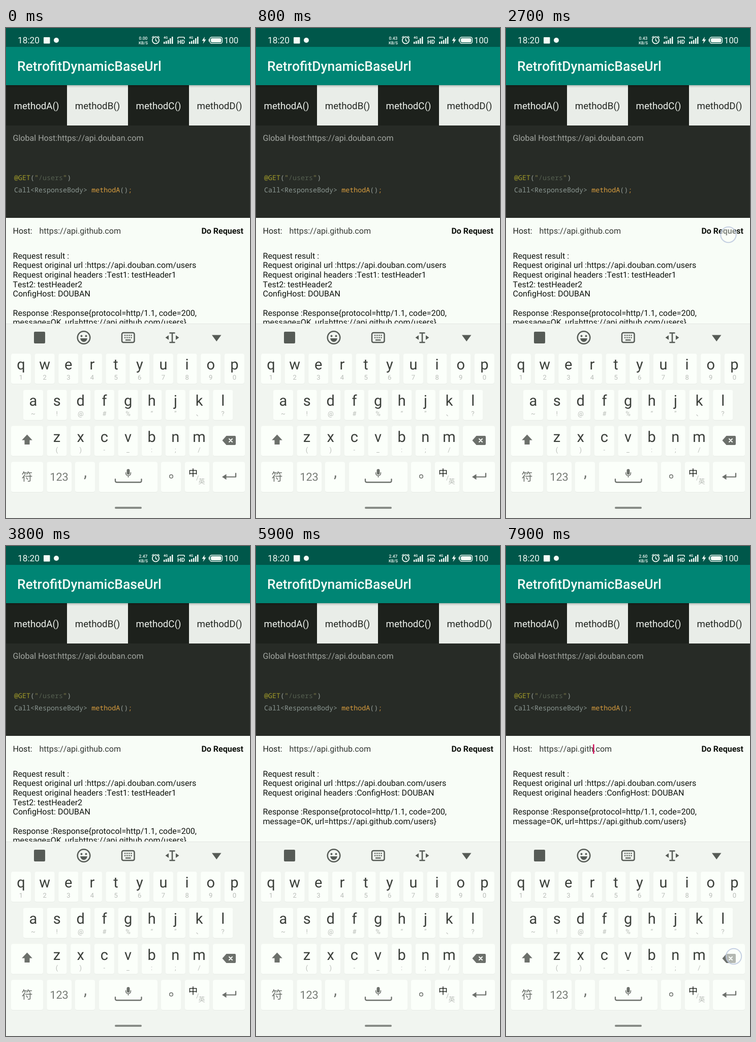
Animation, 480 px wide and 960 px high, one loop 8 s. Source, as an HTML page:

```html
<!DOCTYPE html>
<html lang="en">
<head>
<meta charset="utf-8">
<title>Base URL demo</title>
<style>
html, body { margin: 0; width: 100%; height: 100%; overflow: hidden; background: #f1f5f0; }
svg { display: block; width: 480px; height: 960px; font-family: Roboto, sans-serif; font-kerning: none; text-rendering: geometricPrecision; }
.mid { text-anchor: middle; }
.mono { font: 13.35px "Noto Sans Mono", "DejaVu Sans Mono", monospace; }
.cjk { font-family: "Noto Sans CJK SC", "Noto Sans CJK", sans-serif; text-anchor: middle; }
.line { fill: none; stroke-linecap: round; stroke-linejoin: round; }
</style>
</head>
<body>
<svg id="stage" viewBox="0 0 480 960"></svg>
<script>
const stage = document.getElementById('stage');
const BODY = 16.07;
const rect = (x, y, w, h, fill, r = 0) =>
  `<rect x="${x}" y="${y}" width="${w}" height="${h}" rx="${r}" fill="${fill}"/>`;
const text = (x, y, s, fill, size = BODY, extra = '') =>
  `<text x="${x}" y="${y}" fill="${fill}" style="font-size:${size}px" ${extra}>${s}</text>`;
const mid = (x, y, s, fill, size, extra = '') => text(x, y, s, fill, size, `class="mid" ${extra}`);
const path = (d, fill) => `<path d="${d}" fill="${fill}"/>`;
const line = (d, stroke, w) => `<path class="line" d="${d}" stroke="${stroke}" stroke-width="${w}"/>`;
const ring = (x, y, r, stroke, w) =>
  `<circle cx="${x}" cy="${y}" r="${r}" fill="none" stroke="${stroke}" stroke-width="${w}"/>`;
const dot = (x, y, r, fill) => `<circle cx="${x}" cy="${y}" r="${r}" fill="${fill}"/>`;
const W = '#f4fbf6', ICON = '#565b56', KEY = '#6c706b', PALE = '#b9bdb8';

function signal(x) {
  let s = text(x, 20.5, '4G', W, 6.5, 'font-weight="700"');
  [4, 5.5, 7.5, 11, 14].forEach((h, i) => s += rect(x + i * 4, 31 - h, 2.5, h, W));
  return s;
}

function statusBar() {
  return rect(0, 0, 480, 37, '#00574a') +
    text(23, 30, '18:20', W, 17.3) +
    rect(74, 18, 12.5, 12.5, W, 1) + dot(99, 24, 5, W) +
    mid(270, 23, '', W, 8.5, 'id="speed" font-weight="500"') +
    mid(270, 31.5, 'KB/S', W, 8, 'font-weight="500"') +
    ring(294.5, 24, 6.6, W, 1.8) + line('M294.5 20.5V24.5L297 26M287.5 18.5L290 16.3M301.5 18.5L299 16.3', W, 1.5) +
    signal(310) +
    line('M338 21V19.5Q338 18 340 18H349Q351 18 351 19.5V21', W, 1.7) +
    mid(344.5, 31, 'HD', W, 11, 'font-weight="700"') +
    signal(360) +
    path('M391 17L385.5 25H389L387.5 31L393.5 22.5H390Z', W) +
    `<rect x="401" y="18" width="24.5" height="12" rx="3.5" fill="none" stroke="${W}" stroke-width="1.4"/>` +
    rect(403, 20, 20.5, 8, W, 2) + rect(398.7, 21.5, 1.6, 5, W) +
    text(429, 30, '100', W, 16.8);
}

function app() {
  let s = rect(0, 37, 480, 75, '#008574') +
    text(22, 84.3, 'RetrofitDynamicBaseUrl', W, 26.5, 'font-weight="500"');
  [...'ABCD'].forEach((c, i) => {
    s += rect(i * 120, 112, 120, 79, i % 2 ? '#e9ede8' : '#1d211c') +
      mid(i * 120 + 60, 158.5, `method${c}()`, i % 2 ? '#20241f' : '#f0f4ef', 18.67);
  });
  s += rect(0, 112, 480, 5, 'url(#shade)') + rect(0, 191, 480, 181, '#272b26') +
    text(13.5, 221, 'Global Host:https://api.douban.com', '#a3a7a2');
  const code = (y, parts) => `<text class="mono" x="16" y="${y}">` +
    parts.map(([t, c]) => `<tspan fill="${c}">${t}</tspan>`).join('') + '</text>';
  s += code(297.5, [['@GET', '#a19b2a'], ['(', '#929b97'], ['"', '#87834f'], ['/users', '#555f50'], ['"', '#87834f'], [')', '#929b97']]) +
    code(321.5, [['Call&lt;ResponseBody&gt; ', '#8b9792'], ['methodA', '#d99d3e'], ['()', '#929b97'], [';', '#bd8536']]);
  return s + rect(0, 372, 480, 207, '#f8fdf7') +
    text(13.5, 403, 'Host:', '#1c201b') +
    text(65.5, 403, '', '#343833', BODY, 'id="host"') +
    `<rect id="caret" y="388.5" width="2.6" height="18.5" fill="#d31c62"/>` +
    text(467, 403, 'Do Request', '#0c100b', 16, 'text-anchor="end" font-weight="700"') +
    '<g id="result" clip-path="url(#pane)"></g>';
}

function toolbar() {
  let s = rect(0, 579, 480, 381, '#f1f5f0') + rect(0, 579, 480, 1, '#e3e7e2') +
    rect(55, 595, 22, 23, ICON, 2) +
    ring(153, 606.5, 12.3, ICON, 2.5) + dot(148.5, 603.5, 1.9, ICON) + dot(157.5, 603.5, 1.9, ICON) +
    path('M146 608H160Q158.5 615 153 615T146 608Z', ICON) +
    `<rect x="228" y="597" width="24.5" height="19" rx="3" fill="none" stroke="${ICON}" stroke-width="2.5"/>` +
    rect(235, 610.2, 10.5, 2.2, ICON);
  for (let i = 0; i < 8; i++) s += rect(233 + i % 4 * 4.1, 601 + (i >> 2) * 4.5, 2.3, 2.3, ICON);
  return s + line('M322.5 597.5H331.5M322.5 616H331.5M327 597.5V616', ICON, 2.5) +
    path('M320 602V611L313.5 606.5ZM334 602V611L340.5 606.5Z', ICON) +
    path('M405 601.5H423.5L414.2 614Z', ICON);
}

function keyboard() {
  const key = (x, y, w) => rect(x, y + 1, w, 59, '#e8ece7', 4) + rect(x, y, w, 59, '#fbfffa', 4);
  const rows = [
    [10, 638, 'qwertyuiop', '1234567890'],
    [34, 709, 'asdfghjkl', '~!@#%“”、?'],
    [80.5, 779.5, 'zxcvbnm', '()-_:;/']
  ];
  let s = '';
  for (const [x0, y, letters, marks] of rows)
    [...letters].forEach((c, i) => {
      const x = x0 + i * 46.65;
      s += key(x, y, 39) + mid(x + 19.5, y + 31.2, c, '#3b3f3a', 29) +
        mid(x + 19.5, y + 51, marks[i], PALE, 13);
    });
  s += key(10, 779.5, 63) + key(407, 779.5, 63);
  for (const [x, w] of [[10, 63], [80.5, 48.5], [136, 39], [183, 115], [305, 39], [352, 48], [407, 63]])
    s += key(x, 850, w);
  return s +
    path('M41.5 796.5L51.8 807.5H46.5V816H36.5V807.5H31.2Z', KEY) +
    path('M425.5 808L433.5 799H450Q452 799 452 801V815Q452 817 450 817H433.5Z', KEY) +
    line('M439 805L445 811M445 805L439 811', '#fbfffa', 2) +
    text(41.5, 886.5, '符', KEY, 22, 'class="cjk"') +
    mid(104.5, 886.5, '123', '#767a75', 21.7) +
    mid(156, 880, ',', KEY, 31) +
    rect(237.5, 864, 6, 11, KEY, 3) + line('M235.5 871Q235.5 877 240.5 877T245.5 871M240.5 877V880', KEY, 1.5) +
    line('M215 884V887Q215 890 218 890H263.5Q266.5 890 266.5 887V884', KEY, 2.3) +
    ring(325, 878.5, 3.3, KEY, 1.5) +
    text(368, 878, '中', '#171b16', 18, 'class="cjk"') +
    line('M375 886L378.5 877', PALE, 1) +
    text(385, 893, '英', PALE, 13, 'class="cjk"') +
    line('M452 872.5V879.5H430', KEY, 2.2) + path('M425 879.5L433.5 874V885Z', KEY) +
    rect(214, 938, 53, 4, '#878b86', 2);
}

stage.innerHTML = `<defs>
  <linearGradient id="shade" x2="0" y2="1"><stop stop-opacity=".2"/><stop offset="1" stop-opacity="0"/></linearGradient>
  <clipPath id="pane"><rect y="372" width="480" height="207"/></clipPath></defs>` +
  statusBar() + app() + toolbar() + keyboard() +
  '<circle id="touch" r="15.2" fill="#fbfffa" fill-opacity=".5" stroke="#bcc8de" stroke-opacity=".85" stroke-width="2"/>';

const [speed, host, caret, result, touch] =
  ['speed', 'host', 'caret', 'result', 'touch'].map(id => document.getElementById(id));
const head = ['Request result :', 'Request original url :https://api.douban.com/users'];
const tail = ['ConfigHost: DOUBAN', '', 'Response :Response{protocol=http/1.1, code=200,',
  'message=OK, url=https://api.github.com/users}'];
const label = 'Request original headers :';
const lines = list => list.map((s, i) => text(13.5, 451.8 + i * 18.66, s, '#10140f')).join('');
const before = lines([...head, label + 'Test1: testHeader1', 'Test2: testHeader2', ...tail]);
const after = lines([...head, label + tail[0], ...tail.slice(1)]);
// [start, end, x, y]
const taps = [[2600, 2750, 437.5, 405], [2750, 2900, 437.5, 407], [7400, 7600, 448, 804], [7800, 8000, 448, 804]];
let shown;

function frame(now) {
  const t = now % 8000;
  speed.textContent = t < 400 ? '0.00' : t < 3400 ? '0.43' : t < 6400 ? '2.47' : '2.60';
  const deleted = (t >= 7400) + (t >= 7800);
  host.textContent = `https://api.${'github'.slice(0, 6 - deleted)}.com`;
  caret.setAttribute('x', 188.8 - deleted * 8.9);
  const phase = t % 1000;
  caret.setAttribute('visibility', deleted || phase >= 150 && phase < 650 ? 'visible' : 'hidden');
  const next = t < 4100 ? before : after;
  if (next !== shown) result.innerHTML = shown = next;
  const tap = taps.find(([a, b]) => t >= a && t < b);
  touch.setAttribute('visibility', tap ? 'visible' : 'hidden');
  if (tap) {
    touch.setAttribute('cx', tap[2]);
    touch.setAttribute('cy', tap[3]);
  }
}

const start = performance.now();
function loop() {
  frame(performance.now() - start);
  requestAnimationFrame(loop);
}
loop();
</script>
</body>
</html>
```
